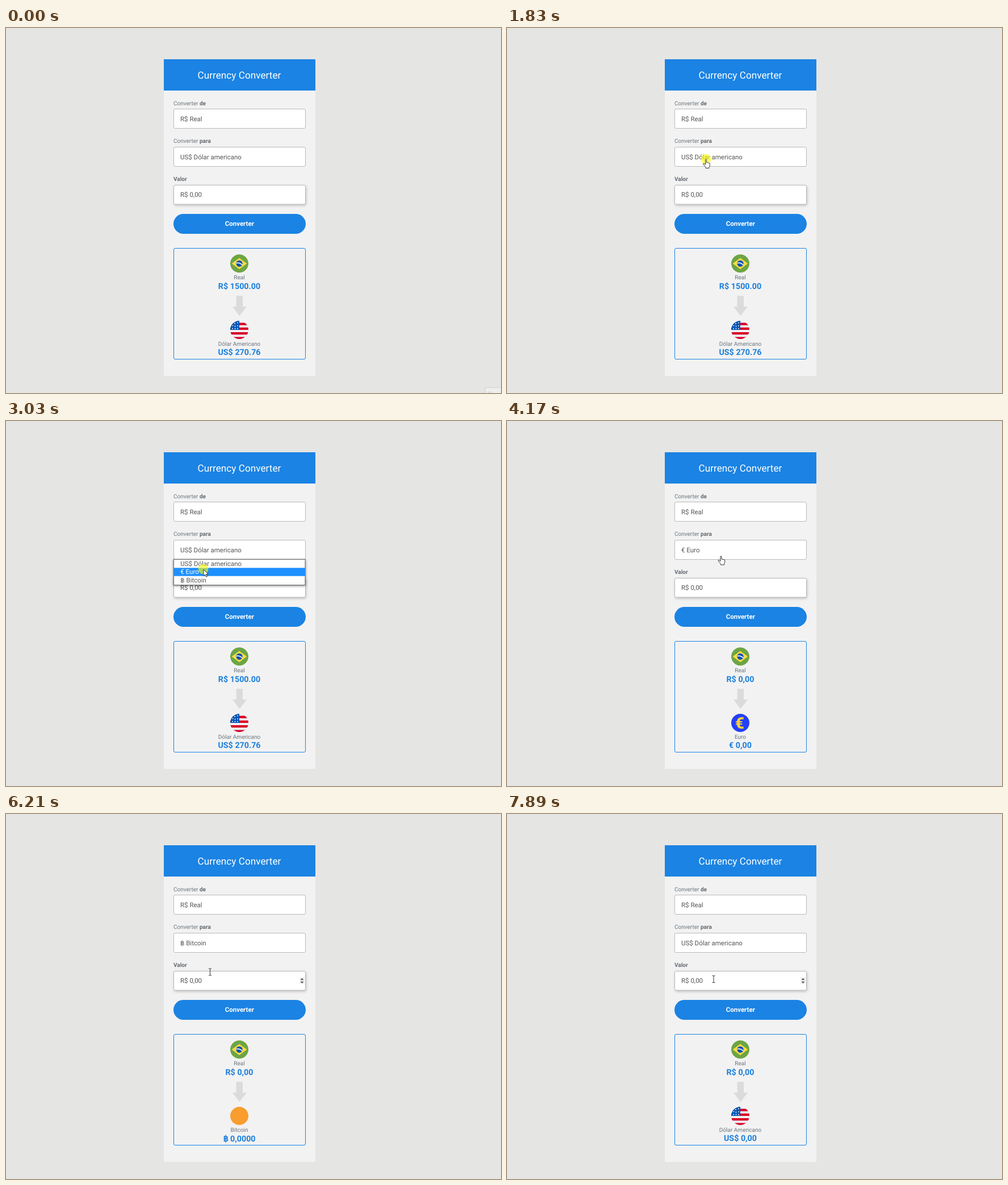
Animation of 872 by 642 pixels, one loop 8 s. Source, as an HTML page:

```html
<!DOCTYPE html>
<html lang="pt-BR">
<head>
<meta charset="utf-8">
<title>Currency Converter</title>
<style>
  html, body { margin: 0; width: 100%; height: 100%; overflow: hidden; background: #e5e5e3; }
  svg { display: block; width: 872px; height: 642px; }
  text { font: 11.5px Roboto, Arial, sans-serif; fill: #555; text-rendering: geometricPrecision; }
  .label { font-size: 10.03px; fill: #6c757d; }
  .label tspan, .bold { font-weight: 700; fill: #666a70; }
  .mid { text-anchor: middle; }
  .value { font-size: 14.3px; font-weight: 700; fill: #1b7fdc; }
  .field { fill: #fff; stroke: #b9b9b9; }
  .list { fill: #fff; stroke: #666; filter: drop-shadow(0 1px 2px #0008); }
  .valor { filter: drop-shadow(1px 2px 2px #0003); }
</style>
</head>
<body>
<svg viewBox="0 0 872 642">
  <defs>
    <clipPath id="disc"><circle cx="411" cy="531" r="16"/></clipPath>
    <clipPath id="globe"><circle cx="411" cy="414.3" r="5.6"/></clipPath>
  </defs>
  <rect width="872" height="642" fill="#e5e5e3"/>
  <g id="status">
    <rect x="844.5" y="632.5" width="40" height="20" fill="#eee" stroke="#d2d2d2"/>
    <path d="M849 640.5h6" stroke="#ccc"/>
  </g>

  <rect x="278" y="55" width="267" height="557" fill="#f2f2f2"/>
  <rect x="278" y="55" width="267" height="55" fill="#1b83e3"/>
  <text class="mid" x="411" y="89" style="font-size:17.2px;fill:#fff">Currency Converter</text>

  <text class="label" x="295" y="135.5">Converter <tspan>de</tspan></text>
  <rect class="field" x="295.5" y="142.5" width="232" height="34" rx="2.5"/>
  <text x="307" y="164">R$ Real</text>
  <text class="label" x="295" y="202.3">Converter <tspan>para</tspan></text>
  <rect class="field" x="295.5" y="209.5" width="232" height="34" rx="2.5"/>
  <text id="chosen" x="307" y="230.6"></text>
  <text class="label bold" x="295" y="269">Valor</text>
  <rect class="field valor" x="295.5" y="276.5" width="232" height="33.5" rx="2.5"/>
  <text x="307" y="297.3">R$ 0,00</text>
  <g id="spinner">
    <rect x="517" y="287" width="9" height="12" fill="#eee"/>
    <path d="M518.7 291.7l2.8-3 2.8 3zM518.7 294.7l2.8 3 2.8-3z" fill="#444"/>
  </g>
  <rect id="button" x="295" y="327" width="233" height="35" rx="17.5"/>
  <text class="mid" x="411.3" y="348.3" style="font-weight:700;fill:#fff">Converter</text>

  <rect x="295.5" y="387.5" width="232" height="195" rx="2.5" fill="none" stroke="#1b83e3"/>
  <circle cx="411" cy="414.3" r="16" fill="#6da544"/>
  <path d="M411 404.4l13.3 9.9-13.3 9.9-13.3-9.9z" fill="#ffda44"/>
  <circle cx="411" cy="414.3" r="5.6" fill="#0052b4"/>
  <path d="M404 414q7-3 13 3.5" clip-path="url(#globe)" fill="none" stroke="#f0f0f0" stroke-width="1.8"/>
  <text class="label mid" x="411" y="442">Real</text>
  <text class="value mid" id="from" x="411" y="458.5"></text>
  <path d="M405.5 471h11.5v19h7l-12.7 16.5-12.3-16.5h6.5z" fill="#dbdbdb"/>

  <g class="icon" clip-path="url(#disc)">
    <rect x="395" y="515" width="32" height="32" fill="#f0f0f0"/>
    <path d="M395 518.5h32v4.2h-32zm0 8.3h32v4.2h-32zm0 8.3h32v4.2h-32zm0 8.4h32v4h-32z" fill="#d80027"/>
    <rect x="395" y="515" width="16" height="16" fill="#0052b4"/>
    <path d="M403 520h.01M408 518.5h.01M399.5 523.5h.01M403.5 524.5h.01M408 523.7h.01M399 528.5h.01M403.5 528.6h.01M408 528.5h.01"
          stroke="#f0f0f0" stroke-width="2.1" stroke-linecap="round"/>
  </g>
  <g class="icon">
    <circle cx="411" cy="531" r="16" fill="#2440f5"/>
    <text class="mid" x="409.8" y="541" style="font-size:28px;font-weight:900;fill:#f8d03c">€</text>
  </g>
  <circle class="icon" cx="411" cy="531" r="16" fill="#f99d2f"/>
  <text class="label mid" id="name" x="411" y="559"></text>
  <text class="value mid" id="to" x="411" y="575.3"></text>

  <g id="menu">
    <rect class="list" x="295.5" y="243.5" width="231.5" height="45"/>
    <rect id="row" x="296" width="231" height="14.4" fill="#1e90ff"/>
    <text class="option" x="307.3" y="255"></text>
    <text class="option" x="307.3" y="269.3"></text>
    <text class="option" x="307.3" y="283.8"></text>
  </g>

  <g id="cursor">
    <circle id="click" r="9" fill="#ff0" opacity=".6"/>
    <path class="shape" d="M.5.5v11.6l2.7-2.5 1.9 4.2 1.9-.9-1.9-4h3.7z" fill="#fff" stroke="#222" stroke-width=".9"/>
    <path class="shape" d="M-1 1.2q1-1.3 2 0v5q1.5-.7 2 .3 1.500-.6 2 .5 1.600-.4 1.700 1v3q0 2-1.200 3v2h-6v-1.600l-4.200-5.200q-.7-1.600 1-1.500l2.700 2z"
          fill="#fff" stroke="#222" stroke-width=".9"/>
    <path class="shape" d="M-2.500-6h2l.5.6.5-.6h2M0-5.500v11M-2.500 6h2l.5-.6.5.6h2" fill="none" stroke="#333"/>
  </g>
</svg>
<script>
const LOOP = 8000;
const $ = id => document.getElementById(id);
const all = name => [...document.querySelectorAll('.' + name)];
const show = (el, on) => el.style.display = on ? '' : 'none';

const currencies = [
  { option: 'US$ Dólar americano', name: 'Dólar Americano', zero: 'US$ 0,00' },
  { option: '€ Euro', name: 'Euro', zero: '€ 0,00' },
  { option: '฿ Bitcoin', name: 'Bitcoin', zero: '฿ 0,0000' }
];
// Pointer hot spot: time, x, y
const path = [
  [70, 700, 640], [400, 560, 470], [640, 470, 350], [870, 430, 308],
  [940, 426, 304], [1150, 390, 262], [1350, 350.500, 230.500],
  [2100, 350.500, 230.500], [2400, 351, 249], [2700, 347.500, 260.500],
  [3240, 347.500, 260.500], [3600, 362, 251], [3910, 377, 237],
  [4640, 377, 237], [4960, 360, 271], [5220, 358, 277],
  [5690, 358, 277], [5750, 359.500, 278],
  [6480, 359.500, 278], [6740, 361, 234],
  [6930, 361, 234], [7140, 362, 251],
  [7460, 362, 251], [7890, 364, 290.500]
];
const menus = [[1900, 3100], [4440, 5690], [6870, 7470]];
const clicks = [[1830, 1960], [3030, 3100], [4370, 4500], [5550, 5690], [6800, 6930], [7400, 7470]];
const picks = [[3100, 1], [5690, 2], [7470, 0]];

const within = (ranges, t) => ranges.find(([a, b]) => t >= a && t < b);
const selected = t => picks.reduce((now, [at, i]) => t >= at ? i : now, 0);

function pointer(t) {
  const i = path.findIndex(p => p[0] > t);
  if (i < 0) return path.at(-1).slice(1);
  if (i === 0) return path[0].slice(1);
  const [t0, x0, y0] = path[i - 1], [t1, x1, y1] = path[i];
  const k = (t - t0) / (t1 - t0);
  return [x0 + (x1 - x0) * k, y0 + (y1 - y0) * k];
}

all('option').forEach((el, i) => el.textContent = currencies[i].option);

function render(t) {
  const [x, y] = pointer(t);
  const pick = selected(t), current = currencies[pick];
  const open = !!within(menus, t);
  const over = (top, bottom) => x > 295 && x < 528 && y >= top && y < bottom;
  const onValor = !open && over(276, 310);
  const onButton = t >= 70 && over(327, 362);
  const onSelect = over(142, 177) || over(209, 243.500);

  show($('status'), t < 70);
  show($('cursor'), t >= 70);
  show($('spinner'), onValor);
  show($('menu'), open);
  show($('click'), within(clicks, t));
  $('cursor').setAttribute('transform', `translate(${x} ${y})`);
  $('button').setAttribute('fill', onButton ? '#1a76cc' : '#1b83e3');

  const shape = onValor ? 2 : onSelect || onButton ? 1 : 0;
  all('shape').forEach((el, i) => show(el, i === shape));
  all('icon').forEach((el, i) => show(el, i === pick));

  const hovered = over(244, 289) ? Math.min(2, Math.floor((y - 243.700) / 14.400)) : pick;
  $('row').setAttribute('y', 243.900 + hovered * 14.400);
  all('option').forEach((el, i) => el.style.fill = i === hovered ? '#fff' : '');

  const fresh = t < picks[0][0];
  $('chosen').textContent = current.option;
  $('name').textContent = current.name;
  $('from').textContent = fresh ? 'R$ 1500.00' : 'R$ 0,00';
  $('to').textContent = fresh ? 'US$ 270.76' : current.zero;
  $('to').setAttribute('y', pick === 2 ? 576 : 575.300);
}

const start = performance.now();
function tick() {
  render((performance.now() - start) % LOOP);
  requestAnimationFrame(tick);
}
tick();
</script>
</body>
</html>
```
